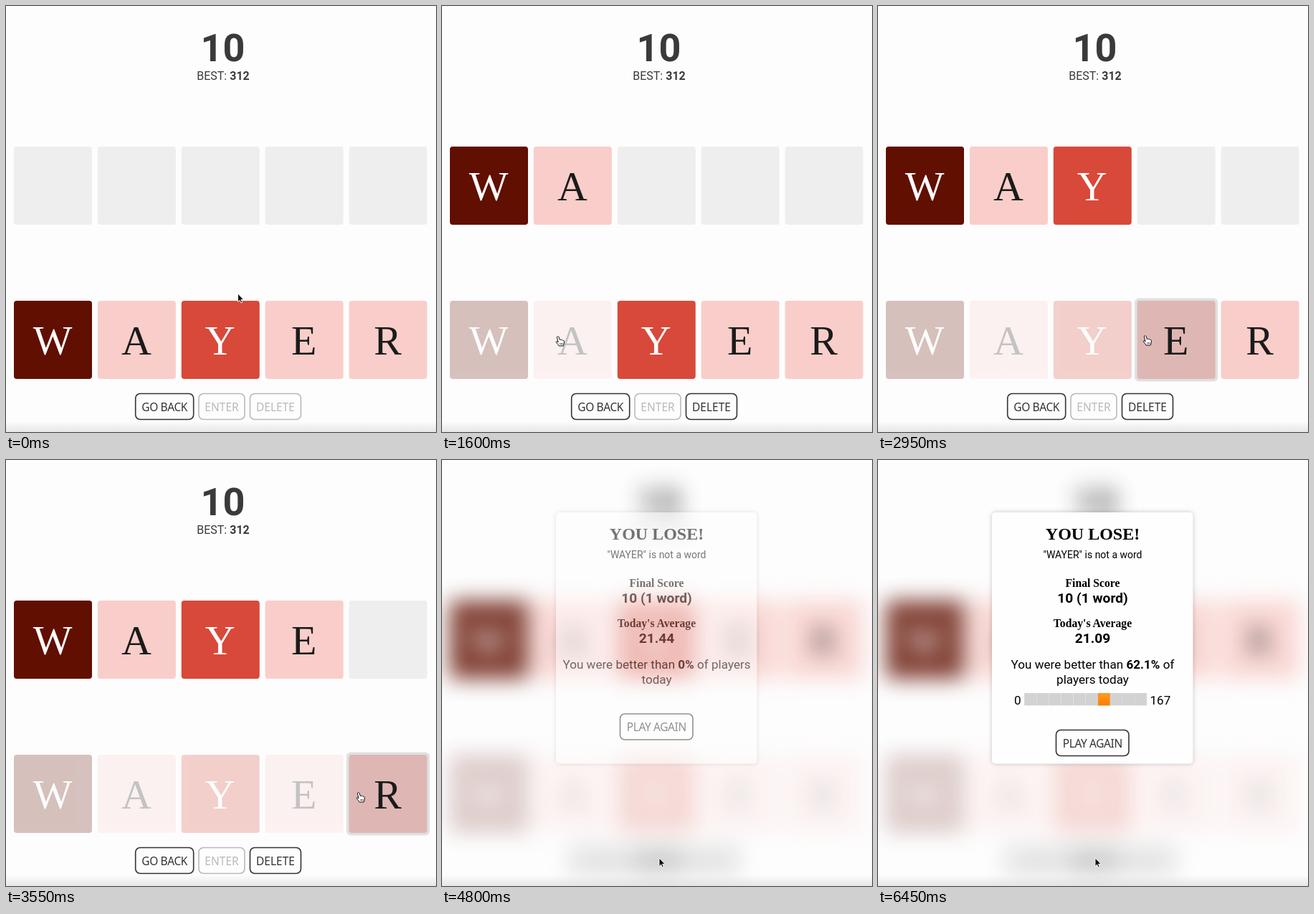
Write an HTML page that moves like this. It is 600 px wide and 594 px high and loops after 6500 ms.

```html
<!DOCTYPE html>
<html lang="en">
<head>
<meta charset="utf-8">
<title>Word game</title>
<style>
  html, body { margin: 0; width: 100%; height: 100%; overflow: hidden; background: #fdfdfd; }
  svg { display: block; width: 600px; height: 594px; }
  text { text-anchor: middle; font-family: Roboto, sans-serif; }
  .start { text-anchor: start; }
  .bold { font-weight: 700; }
  .serif { font-family: "Liberation Serif", "Times New Roman", serif; }
  .score { fill: #3a3a3a; }
  .letter { font-size: 58px; }
  .tile.used { opacity: .25; }
  .halo, .shade { visibility: hidden; }
  .tile.hover .halo, .tile.hover .shade { visibility: visible; }
  .button text { font: 15.5px "Noto Sans", "Open Sans", sans-serif; fill: #333; }
  .button rect { fill: #fdfdfd; stroke: #333; stroke-width: 1.6; }
  .button.off text { fill: #b9b9b9; }
  .button.off rect { stroke: #b9b9b9; }
  .button.hover rect { fill: #dedede; }
  .tight { letter-spacing: -.4px; }
  #game.blurred { filter: blur(15px); opacity: .8; }
  #panel { fill: #fefefe; filter: drop-shadow(0 0 3px rgba(0, 0, 0, .22)); }
  .title { font-size: 24px; }
  .note { font-size: 14px; }
  .label { font-size: 15.7px; }
  .value { font-size: 19.2px; }
  .body { font-size: 17.1px; }
</style>
</head>
<body>
<svg viewBox="0 0 600 594">
  <defs>
    <linearGradient id="fade" x2="0" y2="1">
      <stop offset="0" stop-color="#fdfdfd"/>
      <stop offset="1" stop-color="#e6e6e6"/>
    </linearGradient>
    <linearGradient id="orange" x2="0" y2="1">
      <stop offset="0" stop-color="#ff9c22"/>
      <stop offset="1" stop-color="#ff7d00"/>
    </linearGradient>
  </defs>

  <rect y="579" width="600" height="15" fill="url(#fade)"/>

  <g id="game">
    <text class="score bold" x="302.5" y="77" font-size="54">10</text>
    <text class="score" x="303" y="103" font-size="16">BEST: <tspan class="bold">312</tspan></text>
    <g id="slots"></g>
    <g id="answer"></g>
    <g id="rack"></g>
    <g id="controls"></g>
  </g>

  <g id="dialog">
    <rect id="panel" x="159" y="73" width="280.5" height="350.5" rx="5"/>
    <text class="serif bold title" x="299.5" y="111">YOU LOSE!</text>
    <text class="note" x="299.5" y="137">"WAYER" is not a word</text>
    <text class="serif bold label" x="299.5" y="177">Final Score</text>
    <text class="bold value" x="299.5" y="199">10 (1 word)</text>
    <text class="serif bold label" x="299.5" y="233">Today's Average</text>
    <text class="bold value" x="299.5" y="255" id="average"></text>
    <g id="loading">
      <text class="body" x="299.5" y="291">You were better than <tspan class="bold">0%</tspan> of players</text>
      <text class="body" x="299.5" y="311.5">today</text>
    </g>
    <g id="loaded">
      <text class="body" x="299.5" y="291">You were better than <tspan class="bold">62.1%</tspan> of</text>
      <text class="body" x="299.5" y="311.5">players today</text>
      <text class="body start" x="190" y="340.5">0</text>
      <g id="bar"></g>
      <text class="body start" x="379.5" y="340.5">167</text>
    </g>
    <g id="again"></g>
  </g>

  <g id="cursor">
    <path id="arrow" d="M0 0V11.6L2.7 9.2 4.4 13 6.3 12.2 4.6 8.4H8.2Z" fill="#111" stroke="#fff" stroke-width=".9"/>
    <g id="hand" stroke="#111" stroke-linejoin="round">
      <path fill="#fff" d="M-1.6 .9C-1.6-.6 .6-.8 1.2 .8L2.4 4.6C3 3.9 4.2 4 4.6 4.8C5.4 4.2 6.3 4.6 6.6 5.5C7.6 5 8.6 5.8 8.5 7L8.2 10 7.2 13H1.2C0 11-1.4 9.5-2.6 8C-3.2 7-2 6.2-1 7L.1 8Z"/>
      <path fill="none" stroke-width=".7" d="M2.8 9V11.3M4.5 9V11.3M6.2 9V11.3"/>
    </g>
  </g>
</svg>
<script>
const LOOP = 6500;
const TILE = 109, STEP = 116.9, LEFT = 11, TOP_ROW = 196, RACK_ROW = 411;
const BLUR_AT = 4500, FADE_AT = 4550, FADE_MS = 470, LOADED_AT = 5100;

const dark = ['#610f00', '#fff'], mid = ['#d8493a', '#fff'], pale = ['#f9ceca', '#1b1b1b'];
const letters = [
  { char: 'W', colors: dark, at: 750 },
  { char: 'A', colors: pale, at: 1500 },
  { char: 'Y', colors: mid, at: 2300 },
  { char: 'E', colors: pale, at: 3100 },
  { char: 'R', colors: pale, at: 3650 }
];

// Cursor stops: time, x, y
const path = [
  [0, 323.5, 401], [50, 323.5, 401], [600, 102, 452], [900, 102, 452],
  [1350, 162, 461], [1700, 162, 461], [2150, 279, 463], [2450, 279, 463],
  [2850, 373, 460], [3150, 373, 460], [3500, 492, 464], [3700, 492, 464],
  [4150, 303, 555], [LOOP, 303, 555]
];

const $ = id => document.getElementById(id);

function add(parent, name, attrs = {}, content = '') {
  const el = document.createElementNS('http://www.w3.org/2000/svg', name);
  for (const key in attrs) el.setAttribute(key, attrs[key]);
  el.textContent = content;
  return parent.appendChild(el);
}

function square(parent, x, y, fill, extra = {}) {
  return add(parent, 'rect', { x, y, width: TILE, height: TILE, rx: 4, fill, ...extra });
}

function makeTile(parent, { char, colors }, x, y) {
  const g = add(parent, 'g', { class: 'tile' });
  add(g, 'rect', { class: 'halo', x: x - 3.5, y: y - 3.5, width: TILE + 7, height: TILE + 7, rx: 6, fill: '#e0e0e0' });
  square(g, x, y, colors[0]);
  square(g, x, y, '#000', { class: 'shade', 'fill-opacity': .11 });
  add(g, 'text', { class: 'serif letter', x: x + 54, y: y + 75, fill: colors[1] }, char);
  return g;
}

function makeButton(parent, label, x, y, width, tight) {
  const g = add(parent, 'g', { class: 'button' });
  add(g, 'rect', { x, y, width, height: 36, rx: 6.5 });
  add(g, 'text', { class: tight ? 'tight' : '', x: x + width / 2, y: y + 24 }, label);
  return g;
}

letters.forEach((letter, i) => {
  letter.x = LEFT + i * STEP;
  square($('slots'), letter.x, TOP_ROW, '#eee');
  letter.placed = makeTile($('answer'), letter, letter.x, TOP_ROW);
  letter.tile = makeTile($('rack'), letter, letter.x, RACK_ROW);
});

makeButton($('controls'), 'GO BACK', 180.7, 540.5, 81, true);
const enter = makeButton($('controls'), 'ENTER', 269, 540.5, 64);
const del = makeButton($('controls'), 'DELETE', 340.5, 540.5, 71);
makeButton($('again'), 'PLAY AGAIN', 248.5, 354, 101.5, true);

for (let i = 0; i < 10; i++) {
  add($('bar'), 'rect', { x: 204.2 + i * 17.1, y: 325, width: 16.9, height: 17.3, fill: '#d2d2d2' });
}
const marker = add($('bar'), 'rect', {
  x: 307.2, y: 325.6, width: 16, height: 16.4, fill: 'url(#orange)', stroke: '#f08a1c', 'stroke-width': .8
});

function cursorAt(t) {
  const i = path.findIndex(stop => stop[0] > t);
  const [t0, x0, y0] = path[i - 1], [t1, x1, y1] = path[i];
  const p = (t - t0) / (t1 - t0), k = p * p * (3 - 2 * p);
  return [x0 + (x1 - x0) * k, y0 + (y1 - y0) * k];
}

const inside = (x, y, left, top, w, h) => x >= left && x <= left + w && y >= top && y <= top + h;
const show = (el, on) => { el.style.display = on ? '' : 'none'; };

function render(t) {
  const [x, y] = cursorAt(t);
  const over = t >= BLUR_AT, loaded = t >= LOADED_AT;
  let pointing = false;

  for (const { x: left, at, tile, placed } of letters) {
    const used = t >= at;
    const under = inside(x, y, left, RACK_ROW, TILE, TILE);
    pointing = pointing || under;
    show(placed, used);
    tile.classList.toggle('used', used);
    tile.classList.toggle('hover', under && !used);
  }

  const full = t >= letters[4].at;
  const onEnter = full && inside(x, y, 269, 540, 64, 37);
  del.classList.toggle('off', t < letters[0].at);
  enter.classList.toggle('off', !full);
  enter.classList.toggle('hover', onEnter);

  $('game').classList.toggle('blurred', over);
  show($('dialog'), t >= FADE_AT);
  $('dialog').style.opacity = Math.max(0, Math.min(1, (t - FADE_AT) / FADE_MS));
  $('average').textContent = loaded ? '21.09' : '21.44';
  show($('loading'), !loaded);
  show($('loaded'), loaded);
  $('again').setAttribute('transform', `translate(0 ${loaded ? 22.5 : 0})`);
  marker.style.opacity = .7 + .3 * Math.cos((t - 6450) / 1000 * 2 * Math.PI);

  const hand = !over && (pointing || onEnter);
  show($('hand'), hand);
  show($('arrow'), !hand);
  $('cursor').setAttribute('transform', `translate(${x} ${y})`);
}

const began = performance.now();
function tick() {
  render((performance.now() - began) % LOOP);
  requestAnimationFrame(tick);
}
render(0);
requestAnimationFrame(tick);
</script>
</body>
</html>
```
